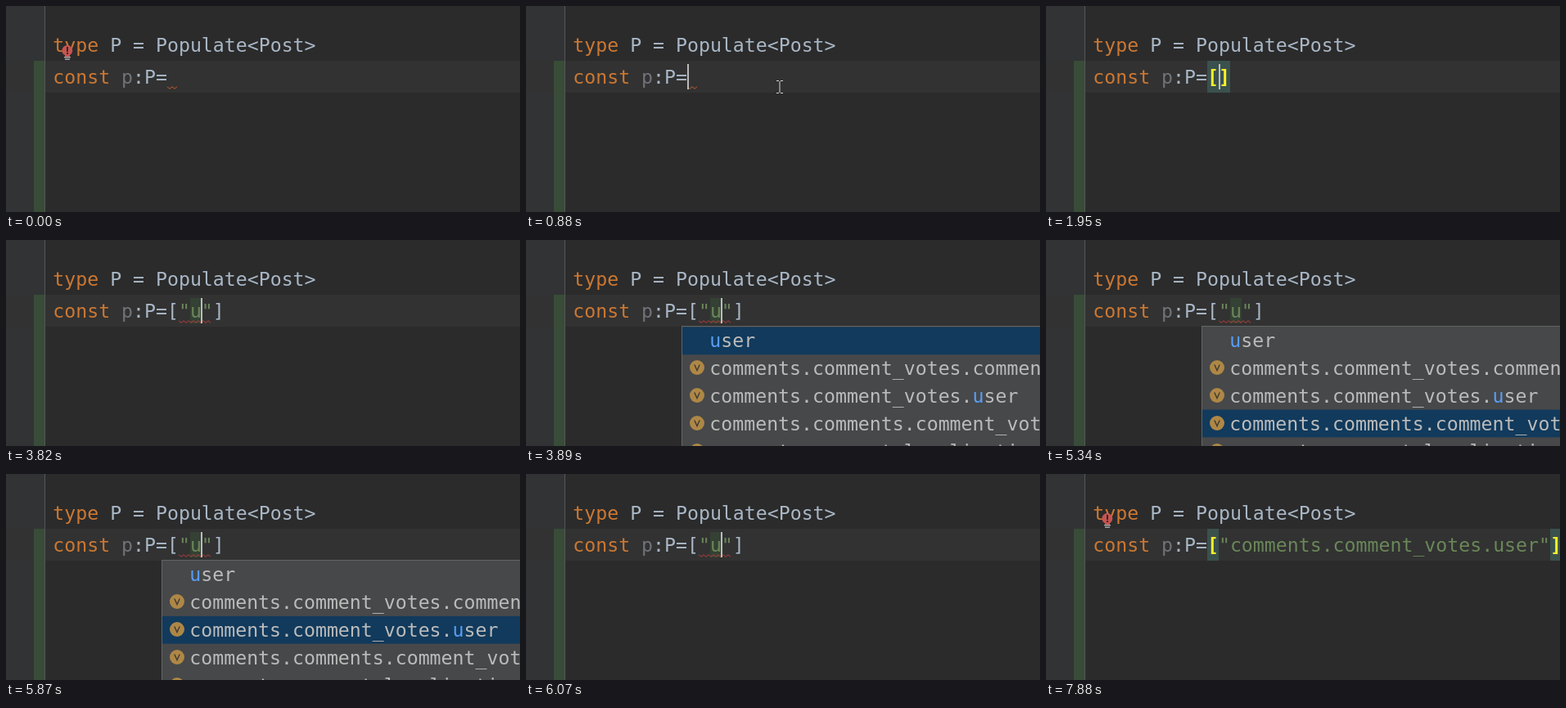
Recreate the animation shown at these times as an HTML page with a canvas. Size 628 by 252 pixels, loop 8 s.

```html
<!DOCTYPE html>
<html lang="en">
<head>
<meta charset="utf-8">
<title>Editor completion</title>
<style>
html, body { margin: 0; width: 100%; height: 100%; overflow: hidden; background: #2b2b2b; }
canvas { display: block; }
</style>
</head>
<body>
<canvas id="stage" width="628" height="252"></canvas>
<script>
const ctx = document.getElementById('stage').getContext('2d');
const LOOP = 8000, CELL = 13.967, LEFT = 57.3;
const FONT = '23.2px "DejaVu Sans Mono", monospace';
const TEXT = '#a9b7c6', KEYWORD = '#cc7832', STRING = '#6a8759', UNUSED = '#72737a';
const ERROR = '#bc3f3c', MATCH = '#ffef28';
const PICK = 'comments.comment_votes.user';
const ROWS = ['user', 'comments.comment_votes.comment', PICK,
  'comments.comments.comment_votes', 'comments.comment_localizations'];

// Stepwise tracks: [start time, value]
const typed = [[0, ''], [1550, '[]'], [2560, '[""]'], [3690, '["u"]'], [6140, `["${PICK}"]`]];
const caret = [[0, 0], [810, 10], [1480, 0], [1950, 11], [2560, 12], [3690, 13], [4350, 0],
  [4810, 13], [5210, 0], [5800, 13], [6140, 40], [7880, 0]];
const selected = [[0, -1], [3890, 0], [4480, 1], [4880, 2], [5340, 3], [5870, 2], [6070, -1]];
const pointer = [[0, null], [130, [464, 180]], [200, [352, 118]], [270, [299, 85]], [540, [300, 85]],
  [740, [304, 87]], [810, [309, 91]], [880, [306, 91]], [950, [303, 90]], [1550, null]];

const at = (track, t) => track.findLast(([start]) => start <= t)[1];
const during = (t, from, to) => t >= from && t < to;
const col = n => LEFT + n * CELL;

function rect(x, y, w, h, color) {
  ctx.fillStyle = color;
  ctx.fillRect(x, y, w, h);
}

function disc(x, y, r, color) {
  ctx.fillStyle = color;
  ctx.beginPath();
  ctx.arc(x, y, r, 0, 2 * Math.PI);
  ctx.fill();
}

function write(text, x, y, color, weight = '') {
  ctx.font = `${weight} ${FONT}`;
  ctx.fillStyle = color;
  [...text].forEach((char, i) => ctx.fillText(char, x + i * CELL, y));
}

function squiggle(from, to, color = ERROR) {
  const start = Math.round(col(from)), end = Math.round(col(to)) - 1;
  ctx.strokeStyle = color;
  ctx.lineWidth = 1;
  ctx.beginPath();
  for (let x = start, i = 0; x <= end; x += 3, i++) ctx.lineTo(x, i % 2 ? 101.3 : 98.7);
  ctx.stroke();
}

function drawBackground() {
  rect(0, 0, 628, 252, '#2b2b2b');
  rect(0, 0, 47, 252, '#313335');
  rect(0, 67, 628, 39, '#323232');
  rect(34, 67, 13, 185, '#384c38');
  rect(47, 0, 1, 252, '#555759');
}

function drawCode(t) {
  const value = at(typed, t), last = 9 + value.length;
  const matching = during(t, 1620, 2560) || t >= 6470;
  write('type', col(0), 56, KEYWORD);
  write('P = Populate<Post>', col(5), 56, TEXT);
  write('const', col(0), 95, KEYWORD);
  write('p', col(6), 95, UNUSED);
  write(':P=', col(7), 95, TEXT);

  if (during(t, 3820, 6140)) rect(225, 71, 14, 31, '#344134');
  if (value) {
    for (const [char, c] of [['[', 10], [']', last]]) {
      if (matching) rect(Math.round(col(c)), 67, 14, 39, '#3b514d');
      write(char, col(c), 95, matching ? MATCH : TEXT, matching ? 'bold' : '');
    }
    write(value.slice(1, -1), col(11), 95, STRING);
  }

  if (t < 1550) squiggle(10, 11, '#c75a2c');
  else if (t < 1950) squiggle(12, 13, '#c75a2c');
  else if (during(t, 3030, 6740)) squiggle(11, last);

  const place = at(caret, t);
  if (place) rect(Math.floor(col(place) + 0.1), 71, 2, 31, '#bbbbbb');
}

function drawBulb() {
  disc(74.8, 54.5, 6.5, '#c75450');
  rect(72, 59, 6, 3, '#c75450');
  rect(74, 50, 2, 6, '#2b2b2b');
  rect(74, 57, 2, 2, '#2b2b2b');
  rect(71, 62, 8, 1.5, '#9fa1a3');
  rect(72, 64.5, 6, 1.5, '#9fa1a3');
}

function drawPopup(choice) {
  rect(190, 105, 438, 147, '#616365');
  rect(191, 106, 437, 146, '#46484a');
  rect(191, 106.5 + choice * 33.7, 437, 33.7, '#113a5c');
  ROWS.forEach((row, i) => {
    const y = 131 + i * 34;
    write(row, 224.3, y, '#bbbbbb');
    const hit = row.search(/user$/);
    if (hit >= 0) {
      const x = 224.3 + hit * CELL;
      rect(x, y - 15, CELL, 17, i === choice ? '#113a5c' : '#46484a');
      write('u', x, y, '#589df6');
    }
    if (i) {
      disc(209, y - 9, 9, '#ae8746');
      ctx.strokeStyle = '#3e3a32';
      ctx.lineWidth = 1.4;
      ctx.stroke(new Path2D(`M205.8 ${y - 12.5}L209 ${y - 5.5}L212.2 ${y - 12.5}`));
    }
  });
}

function drawPointer([x, y]) {
  const color = '#d4d4d4';
  rect(x, y, 3, 1, color);
  rect(x + 5, y, 3, 1, color);
  rect(x + 3.5, y + 1, 1, 14, color);
  rect(x, y + 15, 3, 1, color);
  rect(x + 5, y + 15, 3, 1, color);
}

function draw(now) {
  const t = now % LOOP;
  drawBackground();
  drawCode(t);
  if (t < 740 || t >= 7420) drawBulb();
  const choice = at(selected, t), spot = at(pointer, t);
  if (choice >= 0) drawPopup(choice);
  if (spot) drawPointer(spot);
}

const begin = performance.now();
function tick() {
  draw(performance.now() - begin);
  requestAnimationFrame(tick);
}
tick();
</script>
</body>
</html>
```
